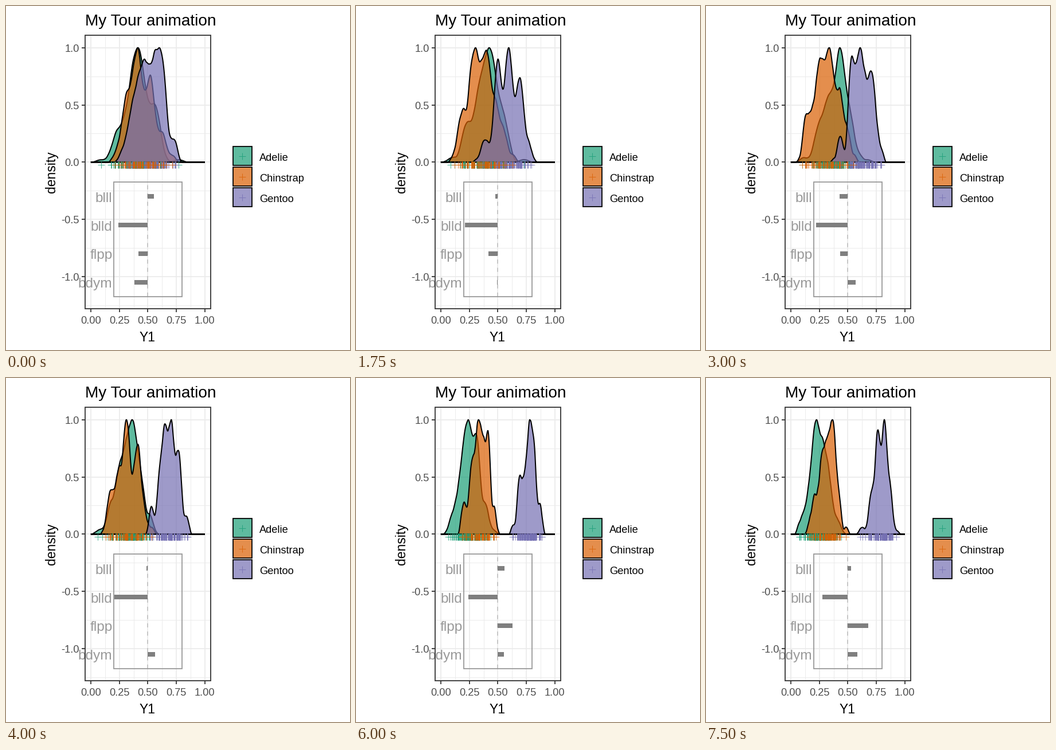
Animation, 600 px wide and 600 px high, one loop 8 s. Source, as a matplotlib script:

```python
import numpy as np
import matplotlib.pyplot as plt
from matplotlib.animation import FuncAnimation
from matplotlib.colors import to_rgba
from matplotlib.patches import Polygon, Rectangle

PT = 0.72                      # points per pixel at 100 dpi
TICK = 125                     # ms
FRAMES = 64
STARTS = [0, 4, 9, 14, 19] + list(range(24, FRAMES, 4))   # ticks of the tour steps

X0, Y0, SX, SY = 147.9, 272.3, 199, 199.5
LEFT, RIGHT, TOP, BOTTOM = 138, 357, 51, 528
MID = 247
GRID = np.linspace(0, 1, 400)

# bill length and depth, flipper length (mm), body mass (g)
VARIABLES = ["blll", "blld", "flpp", "bdym"]
LOW = np.array([32.1, 13.1, 172, 2700])
SPAN = np.array([27.5, 8.4, 59, 3600])

# colour, count, mean, half the gap between the sexes, spread within a sex
SPECIES = {
    "Adelie": ("#1B9E77", 146, [38.8, 18.35, 190, 3700],
               [1.25, 0.6, 1.9, 270], [2.3, 1.05, 6.1, 360]),
    "Chinstrap": ("#D95F02", 68, [48.8, 18.42, 196, 3733],
                  [1.8, 0.65, 3.2, 165], [2.6, 0.9, 6.2, 340]),
    "Gentoo": ("#7570B3", 119, [47.5, 14.98, 217, 5076],
               [1.6, 0.6, 3.7, 330], [2.6, 0.72, 5.3, 350]),
}
RUG_ORDER = ["Adelie", "Gentoo", "Chinstrap"]

# the tour passes through these projections
KEY_STEPS = [0, 5, 9, 11, 14]
KEY_BASES = np.array([
    [.18, -.86, -.27, -.39], [-.23, -.91, -.22, .24], [.18, -.93, .21, .18],
    [.20, -.85, .44, .18], [.10, -.73, .60, .28],
])
SCALE, CENTRE = 0.757, 0.457

rng = np.random.default_rng(7)
MIX = np.linalg.cholesky(0.75 * np.eye(4) + 0.25)


def sample(n, mean, gap, spread):
    """A cloud of two sexes whose noise has an exact covariance."""
    z = rng.standard_normal((n, 4))
    z -= z.mean(axis=0)
    z = z @ np.linalg.inv(np.linalg.cholesky(np.cov(z.T))).T @ MIX.T
    sex = np.where(np.arange(n) % 2, 1, -1)[:, None]
    return (mean + sex * np.array(gap) + z * spread - LOW) / SPAN


clouds = {name: sample(*spec[1:]) for name, spec in SPECIES.items()}
pooled = np.vstack(list(clouds.values())).mean(axis=0)


def basis(step):
    b = np.array([np.interp(step, KEY_STEPS, col) for col in KEY_BASES.T])
    return b / np.linalg.norm(b)


def density(x):
    """Biweight kernel estimate, scaled to a peak of one."""
    u = (GRID[:, None] - x) / (0.12 * np.ptp(x))
    y = (np.clip(1 - u * u, 0, None) ** 2).sum(axis=1)
    return y / y.max()


fig = plt.figure(figsize=(6, 6), dpi=100, facecolor="white")
ax = fig.add_axes([0, 0, 1, 1])
ax.set(xlim=(0, 600), ylim=(600, 0))
ax.axis("off")


def text(x, y, s, size, color="black", ha="left", z=8, **kw):
    ax.text(x, y, s, fontsize=size * PT, color=color, ha=ha, va="baseline",
            family="Liberation Sans", zorder=z, **kw)


def line(xs, ys, color, width, z, **kw):
    ax.plot(xs, ys, color=color, lw=width * PT, zorder=z,
            solid_capstyle="butt", **kw)


def box(x, y, w, h, color, z, face="none"):
    ax.add_patch(Rectangle((x, y), w, h, fc=face, ec=color, lw=1.8 * PT,
                           zorder=z, joinstyle="miter"))


def plus(color, z):
    return ax.plot([], [], "+", color=color, ms=12 * PT, mew=PT,
                   alpha=0.8, zorder=z)[0]


# grid, axes and titles
for i in range(9):
    x = X0 + SX * i / 8
    line([x, x], [TOP, BOTTOM], "#EBEBEB", 1 if i % 2 else 1.8, 1)
    if i % 2 == 0:
        line([x, x], [BOTTOM, BOTTOM + 6], "#333333", 1.8, 7)
        text(x, 554, f"{i / 8:.2f}", 18.3, "#4D4D4D", "center")
for i in range(-5, 5):
    y = Y0 - SY * i / 4
    line([LEFT, RIGHT], [y, y], "#EBEBEB", 1 if i % 2 else 1.8, 1)
    if i % 2 == 0:
        line([LEFT - 6, LEFT], [y, y], "#333333", 1.8, 7)
        text(128, y + 7, f"{i / 4:.1f}", 18.3, "#4D4D4D", "right")
box(LEFT, TOP, RIGHT - LEFT, BOTTOM - TOP, "#333333", 7)
text(138, 34, "My Tour animation", 28)
text(246.5, 585, "Y1", 22.9, ha="center")
text(85.5, 290, "density", 22.9, ha="center", rotation=90, rotation_mode="anchor")

# loadings panel
line([MID, MID], [Y0 + 1.175 * SY, Y0 + 0.175 * SY], "#BEBEBE", 1.6, 5,
     linestyle=(0, (4.5, 4.5)))
box(X0 + 0.2 * SX, Y0 + 0.175 * SY, 0.6 * SX, SY, "#999999", 5)
bars = []
for i, name in enumerate(VARIABLES):
    y = Y0 + SY * (0.3 + 0.25 * i)
    text(185.5, y + 9.5, name, 24.4, "#999999", "right", z=6)
    bars.append(ax.add_patch(Rectangle((MID, y - 4), 0, 8, fc="#7F7F7F",
                                       lw=0, zorder=6)))

# densities, rugs and legend
areas, rugs = {}, {}
for i, (name, spec) in enumerate(SPECIES.items()):
    color = spec[0]
    fill = to_rgba(color, 0.7)
    areas[name] = ax.add_patch(Polygon([(X0, Y0), (X0 + SX, Y0)], fc=fill, ec="black",
                                       lw=2 * PT, zorder=2 + 0.1 * i))
    rugs[name] = plus(color, 3 + 0.1 * RUG_ORDER.index(name))
    y = 262 + 36 * i
    box(396, y - 17, 33, 33, "black", 7, face=fill)
    plus(color, 8).set_data([412], [y])
    text(442, y + 8, name, 18.3)


def draw(frame):
    step = np.searchsorted(STARTS, frame, side="right") - 1
    b = basis(step)
    for name, cloud in clouds.items():
        x = CENTRE + SCALE * (cloud - pooled) @ b
        areas[name].set_xy(np.column_stack([
            X0 + SX * np.r_[0, GRID, 1], Y0 - SY * np.r_[0, density(x), 0]]))
        rugs[name].set_data(X0 + SX * x, np.full(len(x), 277))
    for bar, load in zip(bars, b):
        bar.set_width(round(0.3 * SX * load))
    return [*areas.values(), *rugs.values(), *bars]


anim = FuncAnimation(fig, draw, frames=FRAMES, interval=TICK,
                     init_func=lambda: draw(0), repeat=True, repeat_delay=0)
plt.show()
```
